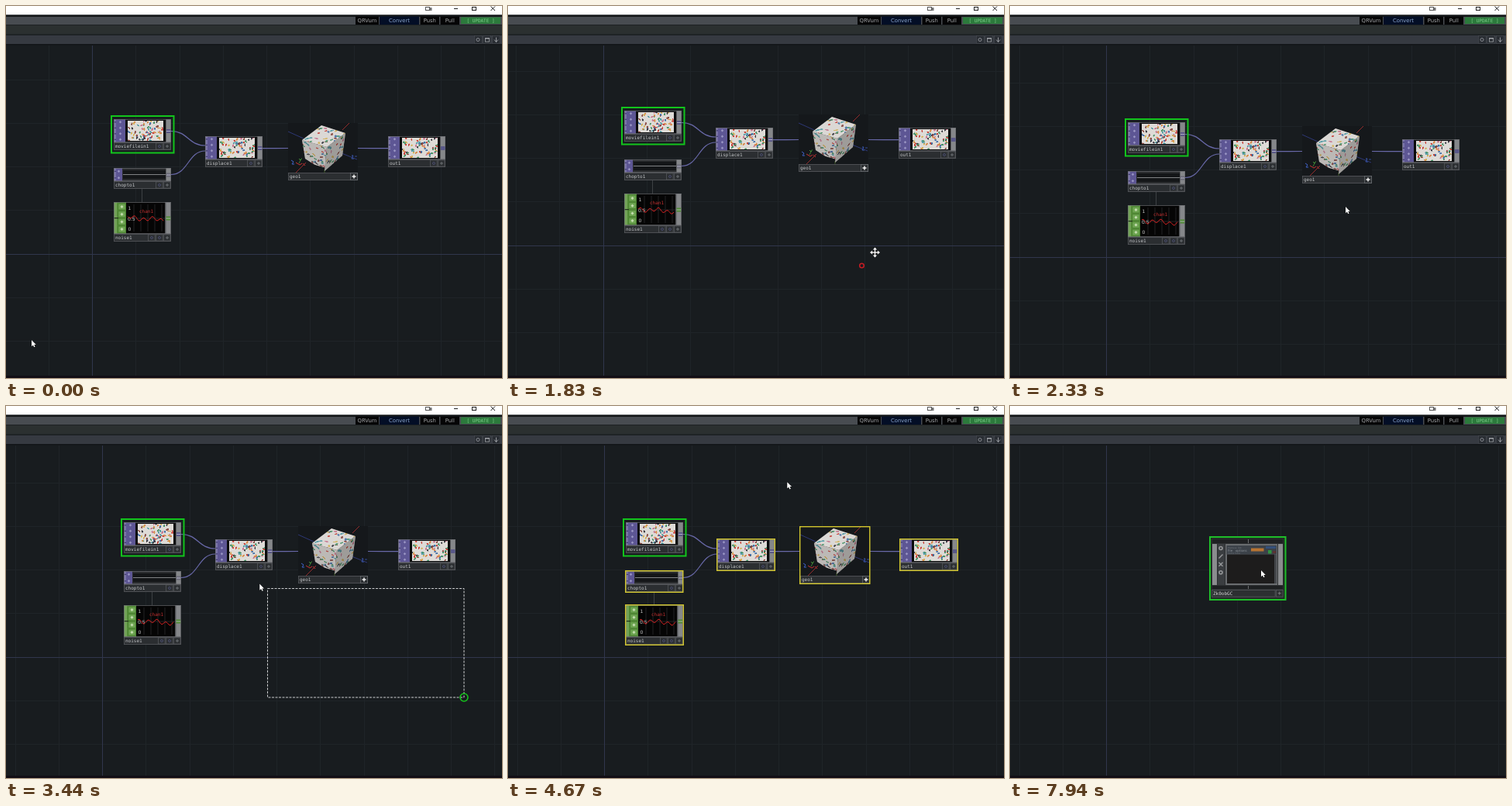
An HTML page with a canvas for the animation above (8000 ms loop, 640x480 px).

```html
<!DOCTYPE html>
<html lang="en">
<head>
<meta charset="utf-8">
<title>Node editor</title>
<style>
html, body { margin: 0; width: 100%; height: 100%; overflow: hidden; background: #181c1f; }
canvas { display: block; width: 640px; height: 480px; }
</style>
</head>
<body>
<canvas id="stage" width="640" height="480"></canvas>
<script>
const LOOP = 8000;
const MONO = '6px "DejaVu Sans Mono", monospace';
const SANS = '"DejaVu Sans", sans-serif';
const stage = document.getElementById('stage');
const ctx = stage.getContext('2d');

// [time, x, y]
const CURSOR = [
  [110, 33, 431], [860, 445, 322], [1350, 456, 335], [1830, 473, 318], [2050, 470, 339],
  [2330, 433, 259], [2480, 433, 259], [2820, 591, 376], [2914, 591, 376], [3914, 103, 105],
  [4420, 103, 105], [4850, 515, 94], [5200, 530, 74], [5650, 518, 17], [6850, 518, 17],
  [7500, 330, 205], [7940, 324, 212]
];
const PAN = [[1400, -13, -4], [1830, -1.4, -15], [2050, 0, 0]];
const PAN_START = 1400, PAN_END = 2050;
const DRAG_START = 2914, DRAG_END = 4400, DRAG_LAG = 13;
const CLICK_START = 6080, CLICK_END = 6350;
const NODES_GONE = 6700, COMP_SHOWN = 6900;

function track(keys, t) {
  if (t <= keys[0][0]) return { x: keys[0][1], y: keys[0][2] };
  for (let i = 1; i < keys.length; i++) {
    const [t0, x0, y0] = keys[i - 1], [t1, x1, y1] = keys[i];
    if (t < t1) {
      const u = (t - t0) / (t1 - t0), s = u * u * (3 - 2 * u);
      return { x: x0 + (x1 - x0) * s, y: y0 + (y1 - y0) * s };
    }
  }
  const last = keys[keys.length - 1];
  return { x: last[1], y: last[2] };
}

function rect(x0, y0, x1, y1, color) {
  ctx.fillStyle = color;
  ctx.fillRect(x0, y0, x1 - x0, y1 - y0);
}
function frame(x0, y0, x1, y1, color, w = 1) {
  ctx.strokeStyle = color;
  ctx.lineWidth = w;
  ctx.strokeRect(x0 + w / 2, y0 + w / 2, x1 - x0 - w, y1 - y0 - w);
}
function trace(p) {
  ctx.beginPath();
  for (let i = 0; i < p.length; i += 2) ctx.lineTo(p[i], p[i + 1]);
}
function line(color, w, ...p) {
  ctx.strokeStyle = color;
  ctx.lineWidth = w;
  trace(p);
  ctx.stroke();
}
function poly(color, ...p) {
  ctx.fillStyle = color;
  trace(p);
  ctx.fill();
}
function ring(x, y, r, color, w) {
  ctx.strokeStyle = color;
  ctx.lineWidth = w;
  ctx.beginPath();
  ctx.arc(x, y, r, 0, 7);
  ctx.stroke();
}
function label(s, x, y, color, font = MONO, align = 'left') {
  ctx.font = font;
  ctx.textAlign = align;
  ctx.fillStyle = color;
  ctx.fillText(s, x, y);
}
function plus(x, y, r, color, w = 1) {
  line(color, w, x - r, y, x + r, y);
  line(color, w, x, y - r, x, y + r);
}

function random(seed) {
  return () => (seed = (seed * 16807) % 2147483647) / 2147483647;
}

// Pale picture scattered with coloured brush dabs
function dabs(seed, w, h, count) {
  const c = document.createElement('canvas');
  c.width = w * 4;
  c.height = h * 4;
  const g = c.getContext('2d'), rnd = random(seed);
  const inks = ['#c8443c', '#d88a4a', '#4a9468', '#4470a8', '#3c3c44', '#4f9aa4', '#d4b258', '#c87890', '#8a4a42'];
  g.scale(4, 4);
  g.fillStyle = '#dedbd7';
  g.fillRect(0, 0, w, h);
  for (let i = 0; i < count; i++) {
    g.fillStyle = inks[Math.floor(rnd() * inks.length)];
    g.beginPath();
    g.ellipse(rnd() * w, rnd() * h, 1.3 + rnd() * 0.9, 0.8 + rnd() * 0.4, rnd() * 3.14, 0, 7);
    g.fill();
  }
  return c;
}
const plainPic = dabs(811, 48, 27, 72);
const shiftedPic = dabs(4243, 48, 27, 72);
const facePic = dabs(977, 32, 32, 46);

function titleBar(cur) {
  rect(0, 0, 640, 11.5, '#ffffff');
  frame(541, 1, 547, 6, '#555');
  rect(547, 2, 549.5, 6, '#777');
  line('#222', 1, 578, 3.5, 583, 3.5);
  frame(601, 1, 607, 6, '#222');
  line('#222', 1, 625.5, 0.5, 631, 6);
  line('#222', 1, 631, 0.5, 625.5, 6);

  rect(0, 11.5, 640, 14, '#15181a');
  rect(0, 14, 640, 24, '#484c51');
  rect(0, 24, 640, 25, '#1d2123');
  rect(0, 25, 640, 36.5, '#2b3030');
  rect(0, 36.5, 640, 38, '#1e2225');
  rect(0, 38, 640, 49, '#363a41');
  rect(0, 49, 640, 50.5, '#121518');

  const hover = cur.y < 24 && cur.x > 482 && cur.x < 533;
  const button = (x0, x1, s, fill, ink) => {
    rect(x0, 13.5, x1, 24, fill);
    label(s, (x0 + x1) / 2, 21.3, ink, '6.8px ' + SANS, 'center');
  };
  button(451, 481, 'QRVum', '#050506', '#a4a6a8');
  button(482, 533, 'Convert', hover ? '#43587f' : '#030e26', hover ? '#8fb0e0' : '#8ea8d0');
  button(534.5, 559, 'Push', '#050506', '#a4a6a8');
  button(560.5, 585, 'Pull', '#050506', '#a4a6a8');
  rect(587, 14.5, 638, 23, '#2c7a3c');
  label('[ UPDATE ]', 612.5, 21, '#7fd08c', MONO, 'center');

  for (const x of [604, 615.5, 627]) {
    rect(x, 38, x + 10.5, 49, '#292d33');
    frame(x, 38, x + 10.5, 49, '#4b4f55', 0.6);
  }
  ring(609, 43.5, 2, '#a0a3a8', 0.8);
  frame(618, 41, 624, 46.5, '#a0a3a8', 0.8);
  rect(618, 41, 624, 42.5, '#a0a3a8');
  line('#a0a3a8', 0.9, 632.5, 40.5, 632.5, 46.5);
  line('#a0a3a8', 0.9, 630, 43.5, 632.5, 46.5, 635, 43.5);
}

function grid(pan) {
  const step = 56.25, ax = 124.5 + pan.x, ay = 324 + pan.y;
  const column = (x, color) => line(color, 1, Math.floor(x) + 0.5, 51, Math.floor(x) + 0.5, 480);
  const row = (y, color) => line(color, 1, 0, Math.floor(y) + 0.5, 640, Math.floor(y) + 0.5);
  for (let i = -3; i < 11; i++) column(ax + i * step, '#1f2428');
  for (let i = -4; i < 5; i++) row(ay + i * step, '#1f2428');
  column(ax, '#30364c');
  row(ay, '#30364c');
}

function footer(x, y, w, name, buttons) {
  rect(x, y, x + w, y + 10, '#2b2e31');
  frame(x, y, x + w, y + 10, '#55585c', 0.8);
  label(name, x + 2, y + 7.2, '#c4c6c8');
  for (let i = 1; i <= buttons; i++) {
    const bx = x + w - i * 10;
    frame(bx, y + 0.5, bx + 9.5, y + 9.5, '#54575b', 0.8);
    if (i === 1) plus(bx + 5, y + 5, 2, '#6b6e72');
    else ring(bx + 5, y + 5, 1.5, '#4c5072', 0.9);
  }
}

function sideBar(x, y, h, tick) {
  rect(x, y, x + 7, y + h, '#85878a');
  rect(x, y, x + 1, y + h, '#5b5d60');
  rect(x + 1, y + h / 2 - 2, x + 7, y + h / 2 + 3, tick);
  line('#c4c4d6', 0.8, x + 1, y + h / 2 + 0.5, x + 7, y + h / 2 + 0.5);
}

function purplePanel(x, y, w, h, rows) {
  rect(x, y, x + w, y + h, '#5d5694');
  rect(x, y, x + 3, y + h, '#7a74a8');
  for (let i = 0; i < rows; i++) {
    const cy = y + (i + 0.5) * h / rows, cx = x + w / 2 + 1;
    rect(x, cy - 0.5, x + 3, cy + 0.7, '#3d3970');
    poly('#9a95c4', cx, cy - 1.7, cx + 1.7, cy, cx, cy + 1.7, cx - 1.7, cy);
  }
}

function picNode(x, y, name, pic) {
  rect(x, y, x + 74, y + 30, '#0b0c0d');
  purplePanel(x, y, 15, 30, 4);
  ctx.drawImage(pic, x + 18, y + 2, 46, 26);
  sideBar(x + 67, y, 30, '#5a5888');
  frame(x, y, x + 74, y + 30, '#6a6b70', 0.7);
  footer(x, y + 30, 74, name, 2);
}

function chopNode(x, y) {
  rect(x, y, x + 74, y + 17, '#2a2c2e');
  purplePanel(x, y, 11, 17, 2);
  rect(x + 12, y + 3, x + 67, y + 14, '#141618');
  line('#808284', 1, x + 12, y + 8.5, x + 67, y + 8.5);
  sideBar(x + 67, y, 17, '#6a6a78');
  frame(x, y, x + 74, y + 17, '#6a6b70', 0.7);
  footer(x, y + 17, 74, 'chopto1', 2);
}

function noiseNode(x, y, t) {
  rect(x, y, x + 74, y + 41, '#050505');
  rect(x, y, x + 16, y + 41, '#558f38');
  rect(x, y, x + 4, y + 41, '#72a258');
  for (let i = 0; i < 4; i++) {
    const cy = y + 6 + i * 9.7;
    rect(x + 6, cy - 4, x + 15, cy + 4, '#6ea552');
    frame(x + 5.5, cy - 4.3, x + 15.5, cy + 4.3, '#447a2c', 0.7);
    poly('#c4dcb0', x + 8.5, cy, x + 10.5, cy - 2, x + 12.5, cy, x + 10.5, cy + 2);
  }
  rect(x, y + 20, x + 6, y + 21.2, '#22301c');
  for (let i = 0; i < 5; i++) line('#303032', 0.7, x + 26 + i * 9, y + 3, x + 26 + i * 9, y + 38);
  line('#303032', 0.7, x + 18, y + 21, x + 66, y + 21);
  label('1', x + 18.5, y + 10, '#c8c8c8', '6px ' + SANS);
  label('0.5', x + 18, y + 23.5, '#c8c8c8', '6px ' + SANS);
  label('0', x + 18.5, y + 37, '#c8c8c8', '6px ' + SANS);
  label('chan1', x + 33, y + 14, '#c03030');

  const phase = (Math.min(t, 2300) - 2300) / 600;
  ctx.beginPath();
  for (let i = 18; i <= 64; i++) {
    const v = 2.2 * Math.sin(i * 0.55 + phase) + 1.4 * Math.sin(i * 0.21 + 2.5 + phase * 0.6) + 0.07 * (i - 40);
    ctx.lineTo(x + i, y + 21.5 + v);
  }
  ctx.strokeStyle = '#cf2222';
  ctx.lineWidth = 1;
  ctx.stroke();
  sideBar(x + 66.5, y, 41, '#4f8a34');
  frame(x, y, x + 74, y + 41, '#6a6b70', 0.7);
  footer(x, y + 41, 74, 'noise1', 3);
}

// Picture laid over the corner o with sides to u and v, cut to the quad o-u-far-v
function face(o, u, far, v, shade) {
  ctx.save();
  trace([...o, ...u, ...far, ...v]);
  ctx.clip();
  ctx.transform((u[0] - o[0]) / 32, (u[1] - o[1]) / 32, (v[0] - o[0]) / 32, (v[1] - o[1]) / 32, o[0], o[1]);
  ctx.drawImage(facePic, -2, -2, 40, 40);
  ctx.fillStyle = shade;
  ctx.fillRect(-2, -2, 40, 40);
  ctx.restore();
}

function geoNode(x, y) {
  ctx.save();
  ctx.translate(x, y);
  rect(0, 0, 90, 64, '#15181b');
  line('#a33030', 0.9, 70, 9, 79, 0);
  line('#a33030', 0.9, 10, 64, 23, 51);
  line('#303c80', 0.9, 0, 11, 20, 20);
  line('#303c80', 0.9, 69, 39, 89, 47);
  line('#4a6a2c', 0.8, 47, 60, 47, 64);
  const left = [18, 22], back = [43, 3], right = [74, 13], front = [50, 31];
  const lowLeft = [22, 46], low = [47, 62], lowRight = [70, 42];
  face(left, back, right, front, 'rgba(200,200,200,.15)');
  face(left, front, low, lowLeft, 'rgba(110,108,106,.3)');
  face(front, right, lowRight, low, 'rgba(60,60,62,.4)');
  line('#3f62c8', 1, 4, 48, 7, 50, 5, 53, 8, 53);
  line('#4a9a3a', 1, 14, 46, 16, 48, 17.5, 45.5);
  line('#4a9a3a', 0.8, 16, 48, 14, 52);
  line('#c83434', 1, 10, 51, 15, 54, 18, 52);
  line('#c83434', 1, 19, 52, 22, 55);
  line('#c83434', 1, 22, 52, 19, 55);
  line('#3a58b0', 1, 82, 42, 84, 42, 82, 46, 85, 46);
  line('#3a58b0', 0.8, 86, 43, 89, 43);
  footer(0, 64, 90, 'geo1', 0);
  frame(80, 64, 90, 74, '#66696d', 0.8);
  plus(85, 69, 2.5, '#f0f0f0', 1.5);
  ctx.restore();
}

function wire(x0, y0, x1, y1) {
  const mid = (x0 + x1) / 2;
  ctx.strokeStyle = '#6868a8';
  ctx.lineWidth = 1.2;
  ctx.beginPath();
  ctx.moveTo(x0, y0);
  ctx.bezierCurveTo(mid, y0, mid, y1, x1, y1);
  ctx.stroke();
}

function network(t, pan) {
  ctx.save();
  ctx.translate(Math.floor(pan.x), Math.floor(pan.y));
  wire(226, 165.5, 270, 184);
  wire(226, 221.5, 270, 191);
  wire(344, 187.7, 377, 187.5);
  wire(467, 187.5, 506, 187.7);
  line('#4a4d50', 0.8, 188.5, 240, 188.5, 257);
  picNode(152, 150, 'moviefilein1', plainPic);
  chopNode(152, 213);
  noiseNode(152, 257, t);
  picNode(270, 172, 'displace1', shiftedPic);
  geoNode(377, 155);
  picNode(506, 172, 'out1', shiftedPic);
  line('#55588c', 1, 574, 187.5, 580, 187.5);
  frame(148, 145, 230.5, 194.5, '#12c41c', 2);
  if (t >= DRAG_END) {
    const yellow = '#d2c62e';
    frame(151, 212, 226.5, 241, yellow, 1.4);
    frame(151, 256, 227, 309, yellow, 1.4);
    frame(269, 171, 345, 213, yellow, 1.4);
    frame(376, 155, 467.5, 230, yellow, 1.4);
    frame(505, 171, 581, 213, yellow, 1.4);
  }
  ctx.restore();
}

function compNode() {
  rect(257, 168, 356, 251, '#1c2a1e');
  rect(260, 171, 353, 248, '#2c2f31');
  rect(261, 172, 352, 177, '#1e2022');
  rect(307, 172, 308, 177, '#6a6c6e');
  rect(261, 178, 267, 231, '#8a8c8e');
  rect(346, 178, 352, 231, '#8a8c8e');
  rect(268, 178, 277, 231, '#3a3d40');
  for (let i = 0; i < 4; i++) {
    const y = 183.5 + i * 10.4;
    if (i === 0 || i === 3) ring(272, y, 2, '#96989a', 1.6);
    else line('#96989a', 1.4, 269.5, y + 2.5, 274.5, y - 2.5);
    if (i === 2) line('#96989a', 1.4, 269.5, y - 2.5, 274.5, y + 2.5);
  }
  rect(278, 178, 345, 231, '#6a6d70');
  rect(279.5, 180, 344, 191.5, '#3c4249');
  label('menu a  list', 281, 184, '#777d84', '3px ' + SANS);
  label('file   options', 281, 188, '#888e94', '4px ' + SANS);
  label('items here', 281, 191, '#6c7278', '3px ' + SANS);
  rect(311, 183.5, 327.5, 187.5, '#b87432');
  rect(330, 181, 343, 184, '#34507a');
  rect(333, 186, 337.5, 190.5, '#2f9440');
  rect(339, 187, 343, 190, '#5a3434');
  rect(280, 191.5, 341, 229, '#1d1c1c');
  rect(341, 191.5, 344, 229, '#43464a');
  rect(261, 232, 352, 236, '#1e2022');
  rect(307, 232, 308, 236, '#6a6c6e');
  frame(260, 237, 342.5, 246.5, '#55585c', 0.8);
  label('Zk0obGC', 262, 244, '#d8dadb');
  frame(343, 237, 352.5, 246.5, '#55585c', 0.8);
  plus(347.7, 241.7, 2, '#77797c');
  frame(257, 168, 356.5, 251, '#1fbe2a', 2);
}

function pointer(c) {
  ctx.save();
  ctx.translate(c.x, c.y);
  const shape = [0, 0, 0, 8.2, 1.9, 6.5, 3.2, 9.3, 4.6, 8.6, 3.3, 5.9, 5.8, 5.9];
  line('rgba(0,0,0,.6)', 1, ...shape, 0, 0);
  poly('#ffffff', ...shape);
  ctx.restore();
}

function moveCursor(c) {
  ctx.save();
  ctx.translate(c.x + 0.5, c.y);
  plus(0, 0, 5, '#000', 3);
  plus(0, 0, 4.5, '#fff', 1.4);
  for (let i = 0; i < 4; i++) {
    poly('#fff', 0, -6.5, 2.6, -3.4, -2.6, -3.4);
    ctx.rotate(Math.PI / 2);
  }
  ctx.restore();
}

function marquee(t) {
  const c = track(CURSOR, t - DRAG_LAG);
  ctx.setLineDash([3, 1.5]);
  frame(Math.round(c.x), Math.round(c.y), 591.5, 376.5, '#c8cacc', 1);
  ctx.setLineDash([]);
  ring(591, 376, 5, '#14c41c', 1.6);
}

function draw(t) {
  const cur = track(CURSOR, t), pan = track(PAN, t);
  rect(0, 0, 640, 480, '#181c1f');
  grid(pan);
  if (t < NODES_GONE) network(t, pan);
  if (t >= COMP_SHOWN) compNode();
  rect(0, 477, 640, 480, '#120e15');
  titleBar(cur);

  const panning = t >= PAN_START && t < PAN_END;
  if (t >= DRAG_START && t < DRAG_END) marquee(t);
  if (panning) ring(456.5, 335, 2.8, '#c81c24', 1.5);
  if (t >= CLICK_START && t < CLICK_END) ring(518, 19, 2.8, '#d84a38', 1.5);
  if (panning) moveCursor(cur);
  else pointer(cur);
}

const start = performance.now();
function tick() {
  draw((performance.now() - start) % LOOP);
  requestAnimationFrame(tick);
}
tick();
</script>
</body>
</html>
```
